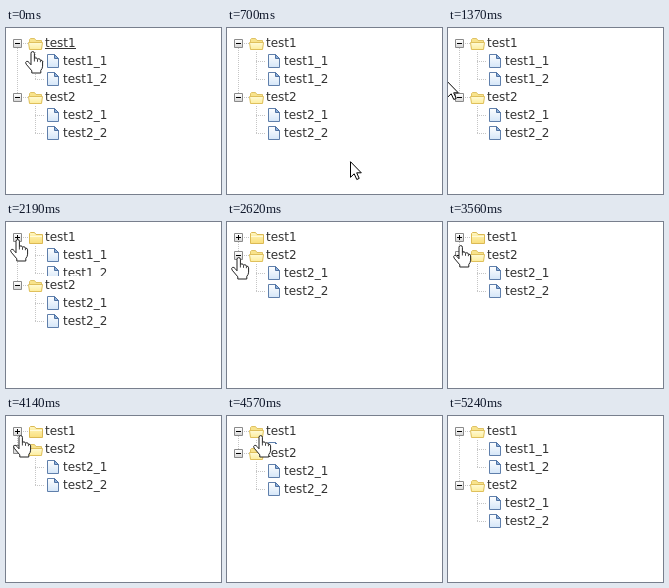
Recreate the animation shown at these times as an HTML page with a canvas. Size 215x166 px, loop 5.83 s.

```html
<!DOCTYPE html>
<html lang="en">
<head>
<meta charset="utf-8">
<title>Tree view</title>
<style>
  html, body { margin: 0; width: 100%; height: 100%; overflow: hidden; background: #fff; }
  canvas { display: block; width: 215px; height: 166px; }
</style>
</head>
<body>
<canvas id="stage" width="215" height="166"></canvas>
<script>
const ctx = document.getElementById('stage').getContext('2d');
const LOOP = 5830;
const ROW = 18;

// Tracks hold each value until the next time: [ms, ...values]
const pointer = [
  [0, 'hand', 19, 23], [150, 'arrow', 16, 26], [310, 'hand', 28, 28],
  [460, 'arrow', 132, 72], [580, 'arrow', 180, 116], [700, 'arrow', 123, 133],
  [850, 'arrow', 119, 124], [980, 'hand', 92, 113],
  [1130, 'arrow', 62, 84], [1250, 'arrow', 20, 41], [1370, 'arrow', -1, 53],
  [1520, 'arrow', 4, 36], [1640, 'hand', 13, 13], [1920, 'hand', 4, 17],
  [2340, 'hand', 4, 42], [2620, 'hand', 4, 35],
  [3440, 'hand', 4, 33], [3560, 'hand', 5, 23], [3680, 'hand', 9, 14],
  [3840, 'hand', 22, 15], [4140, 'hand', 7, 19], [4270, 'hand', 26, 19],
  [4850, 'arrow', 72, 62], [4970, 'arrow', 126, 124], [5090, 'arrow', 149, 162],
  [5240, '']
];
const hover = [
  [0, 'test1'], [150, ''], [980, 'test2_2'], [1130, ''], [3840, 'test1'], [4140, '']
];
// Visible height of each branch and whether it counts as open
const slides = [
  [[0, 36, true], [2190, 30, false], [2340, 0, false], [4570, 4, true],
   [4700, 34, true], [4850, 36, true]],
  [[0, 36, true], [2920, 27, false], [3040, 0, false], [3440, 20, true], [3560, 36, true]]
];

function at(track, t) {
  let key = track[0];
  for (const k of track) if (k[0] <= t) key = k;
  return key.slice(1);
}

function dots(x, y, w, h) {
  ctx.fillStyle = '#c6c6c6';
  for (let i = 0; i < Math.max(w, h); i += 2) {
    ctx.fillRect(x + (w > h ? i : 0), y + (w > h ? 0 : i), 1, 1);
  }
}

function shape(d, x, y, fill, stroke, width = 1) {
  ctx.save();
  ctx.translate(x, y);
  const path = new Path2D(d);
  if (fill) { ctx.fillStyle = fill; ctx.fill(path); }
  if (stroke) {
    ctx.strokeStyle = stroke;
    ctx.lineWidth = width;
    ctx.lineJoin = 'round';
    ctx.stroke(path);
  }
  ctx.restore();
}

function shade(y0, y1, top, bottom) {
  const g = ctx.createLinearGradient(0, y0, 0, y1);
  g.addColorStop(0, top);
  g.addColorStop(1, bottom);
  return g;
}

function label(text, x, y, hovered) {
  ctx.font = '12px "DejaVu Sans", Verdana, sans-serif';
  ctx.fillStyle = '#333';
  ctx.fillText(text, x, y + 4);
  if (text === hovered) ctx.fillRect(x, y + 5, Math.round(ctx.measureText(text).width), 1);
}

function expander(y, open) {
  shape('M.5 .5H8.5V8.5H.5Z', 7, y - 4, shade(1, 9, '#fff', '#d2d2d2'), '#8a8a8a');
  ctx.fillStyle = '#000';
  ctx.fillRect(9, y, 5, 1);
  if (!open) ctx.fillRect(11, y - 2, 1, 5);
}

function folder(y, open) {
  const top = y - 7;
  if (open) {
    shape('M1.5 12.5V3.5L2.5 2.5H6.5L8 4.5H13.5V12.5Z', 22, top, '#f8e38c', '#dfc266');
    shape('M.5 6.5H14.5L13.5 13.5H1.5Z', 22, top, shade(6, 14, '#fffcdc', '#fdec98'), '#dfc05c');
  } else {
    shape('M1.5 13.5V3.5L2.5 2.5H6.5L8 4.5H14.5V13.5Z', 22, top,
      shade(3, 14, '#fff6bd', '#f9dd78'), '#dbb954');
    ctx.fillStyle = '#fffbdc';
    ctx.fillRect(24, top + 6, 12, 1);
  }
}

function page(y) {
  const top = y - 7;
  shape('M.5 .5H7.5L11.5 4.5V13.5H.5Z', 41, top, shade(0, 14, '#fff', '#d3e5f8'), '#5f7fab');
  shape('M7.5 .5V4.5H11.5Z', 41, top, '#8fb2dc', '#4f72a3');
}

function branch(name, y, [height, open], hovered) {
  dots(17, y, 6, 1);
  expander(y, open);
  folder(y, open);
  label(name, 39, y, hovered);
  if (!height) return;
  const top = y + ROW / 2;
  ctx.save();
  ctx.beginPath();
  ctx.rect(0, top, 215, height);
  ctx.clip();
  dots(29, top, 1, 28);
  for (let i = 1; i <= 2; i++) {
    const cy = y + i * ROW;
    dots(29, cy, 10, 1);
    page(cy);
    label(name + '_' + i, 57, cy, hovered);
  }
  ctx.restore();
}

function cursor(kind, x, y) {
  if (kind === 'arrow') {
    shape('M.5 .7V16.3L4.2 12.8L6.8 18.5L9.2 17.4L6.7 11.8H11.3Z', x, y, '#fff', '#000');
  } else if (kind === 'hand') {
    shape('M6 13.8V2.3Q6 .6 7.7 .6Q9.4 .6 9.4 2.3V7.7Q9.7 6.8 11 6.9Q12.4 7 12.5 8.3' +
      'Q13 7.6 14.1 7.8Q15.3 8 15.4 9.2Q17.5 8.8 17.6 10.8V15.2Q17.5 17.6 15.8 19.4V22' +
      'H6.8V19.8L1.2 13.2Q-.1 11.2 1.5 10.4Q3 9.9 4.2 11.6Z', x, y, '#fff', '#222');
    shape('M9.4 7.5V10.5M12.5 8.3V10.8M15.4 9.2V11.2', x, y, null, '#444');
  }
}

function draw(t) {
  ctx.fillStyle = '#fff';
  ctx.fillRect(0, 0, 215, 166);
  const [first, second] = slides.map(s => at(s, t));
  const [hovered] = at(hover, t);
  const y2 = 15 + ROW + first[0];
  dots(11, 20, 1, y2 - 24);
  branch('test1', 15, first, hovered);
  branch('test2', y2, second, hovered);
  cursor(...at(pointer, t));
}

const start = performance.now();
function tick() {
  draw((performance.now() - start) % LOOP);
  requestAnimationFrame(tick);
}
tick();
</script>
</body>
</html>
```
